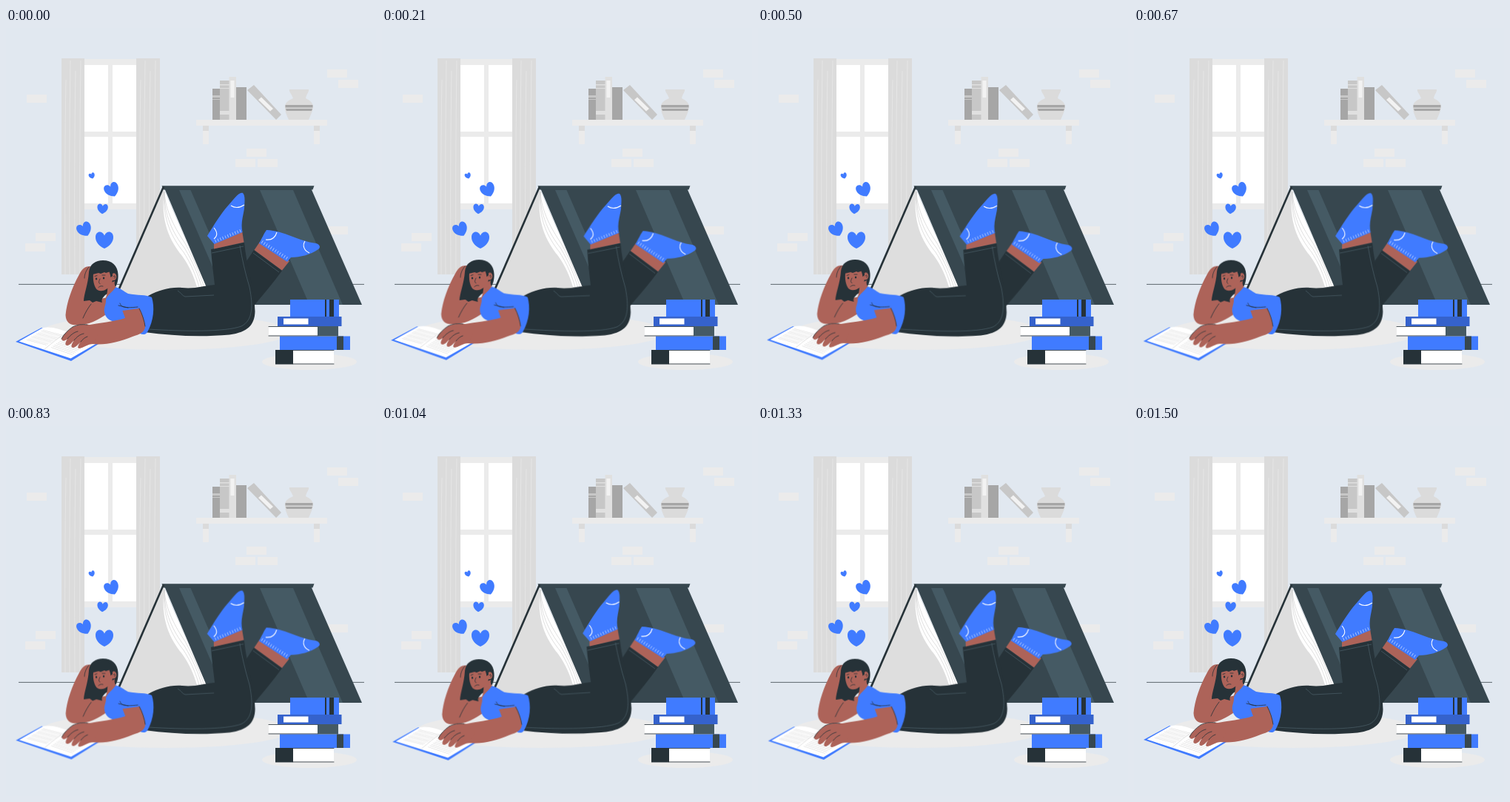
Animation, 500 px wide and 500 px high, one loop 1.54 s. Source, as an HTML page:

```html
<!DOCTYPE html>
<html lang="en">
<head>
<meta charset="utf-8">
<title>Reading by the tent</title>
<style>
  html, body { margin: 0; width: 100%; height: 100%; overflow: hidden; background: #e1e8f0; }
  svg { display: block; width: 100vw; height: 100vh; }
  #reader { transform-origin: 218.5px 336px; }
  .blue { fill: #407bff; }
  .dark { fill: #263238; }
  .slate { fill: #37474f; }
  .steel { fill: #455a64; }
  .skin { fill: #ad6359; }
  .pale { fill: #ebebeb; }
  .white { fill: #fff; }
  .line { fill: none; stroke: #263238; stroke-width: .8; stroke-linecap: round; stroke-linejoin: round; }
  .seam { fill: none; stroke: #536873; stroke-width: .6; }
  .knit { fill: none; stroke: #fff; stroke-width: 1.1; }
  .rib { fill: none; stroke: #dbe6ff; stroke-width: 4; stroke-dasharray: .6 3; }
  .page { fill: none; stroke: #c9c9c9; stroke-width: .6; }
  .text { stroke: #dedede; stroke-width: 1; stroke-dasharray: .03 .065; }
</style>
</head>
<body>
<svg viewBox="0 0 500 500">
  <defs>
    <path id="heart" class="blue" d="M0 12C-7 9-12.500 3-12-4C-11.500-12-3-13 0-5.500C3-13 11.500-12 12-4C12.500 3 7 9 0 12Z"/>
  </defs>

  <g id="bricks" class="pale"></g>

  <!-- window -->
  <path class="pale" d="M104 42H178V245H104Z"/>
  <path class="white" d="M106 50H138V140H106ZM144 50H177V140H144ZM106 147H138V237H106ZM144 147H177V237H144Z"/>
  <path fill="#dbdbdb" d="M75 41H106V333H75ZM176 41H208V333H176Z"/>
  <g id="folds" fill="none" stroke="#e6e6e6" stroke-width="1"></g>

  <!-- shelf -->
  <path class="pale" d="M257 124H434V132H257ZM266 132H274V157H266ZM416 132H424V157H416Z"/>
  <path fill="#dbdbdb" d="M266 132H274V139H266ZM416 132H424V139H416Z"/>
  <path fill="#a6a6a6" d="M279 82H290V124H279ZM310 80H325V124H310Z"/>
  <path fill="#c7c7c7" d="M279 91H290V94H279ZM279 96H290V97H279ZM289 71H302V124H289ZM326 84L335 77L372 117L365 124Z"/>
  <path fill="#e0e0e0" d="M289 76H302V77.500H289ZM289 81H302V82H289ZM289 112H302V117H289ZM301.500 66H311V124H301.500Z"/>
  <path fill="#f2f2f2" d="M303.500 71H308.500V94H303.500ZM341 97L345 93.500L361 109L357 112.500Z"/>
  <path fill="#dbdbdb" d="M383 83H409C410 86 406 89 405 95C411 98 415 101 415 107C414 114 411 119 409 124H382C380 119 377 114 377 107C377 101 381 98 388 95C386 89 382 86 383 83Z"/>
  <path fill="#a6a6a6" d="M377.500 104H414.500V107.500H377.500ZM378 109H414L413 112H379Z"/>

  <path d="M17 346.400H484" stroke="#263238" stroke-width=".7"/>

  <!-- tent -->
  <path fill="#dedede" d="M213 218L144 374H282Z"/>
  <path class="slate" d="M213 214H411L481 374H281Z"/>
  <path class="steel" d="M234 219H249.500L317 374H301.500ZM343 219H388L455 374H410Z"/>
  <path class="slate" d="M210.500 213.300H416.500L414.500 218.500H213Z"/>
  <path class="white" d="M214 219C222 240 232 262 241 282C252 307 262 330 270.500 350H258C254 336 248 322 238 308C222 288 208 262 214 219Z"/>
  <path class="page" d="M214 221C211 258 224 283 240 303C251 320 257 336 261 350M214 221C213 252 226 278 241 297C253 317 260 334 264.500 350M214 221C215 247 229 272 242 291C254 313 262 332 267.500 350"/>
  <path class="dark" d="M211.500 214.500H214.300L145 374H142Z"/>

  <!-- floor -->
  <ellipse class="pale" cx="216" cy="411" rx="168" ry="24"/>
  <ellipse class="pale" cx="410" cy="451" rx="64" ry="11"/>

  <!-- stack -->
  <path class="blue" d="M384 367H450V390H384ZM370 416.500H465V435H370Z"/>
  <path class="dark" d="M431 367H433V390H431ZM437 367H443V390H437ZM364 435H388V454.500H364Z"/>
  <path fill="#3562cc" d="M367 390H453.500V403H367Z"/>
  <path class="white" d="M375 392.500H408.500V400.500H375ZM355 404H421V415H355ZM388 436.500H443V453H388Z"/>
  <path class="steel" d="M421 403H449V416.500H421Z"/>
  <path class="slate" d="M447 416.500H456V435H447Z"/>
  <path class="line" d="M355 403.500H421M355 416H421M388 435.500H443M388 454H443"/>

  <g id="hearts"></g>

  <g id="reader">
    <!-- open book -->
    <path class="blue" d="M13 424L48 405L52 406L125 427L88 450Z"/>
    <path class="white" d="M17.500 423.500L50 405C62 403 72 407 84 411C96 411 112 419 122 426.500L87.500 446.500Z"/>
    <path class="page" d="M84 411C72 417 62 426 52 434"/>
    <path class="text" d="M.5 0V1" transform="matrix(27 7 -23 14 50 408)"/>
    <path class="text" d="M.5 0V1" transform="matrix(29 10 -24 17 84 415)"/>

    <!-- far leg -->
    <path class="dark" d="M335 300L373 328C362 343 349 359 336 374L318 390L315 330Z"/>
    <path class="seam" d="M334 304L369 330"/>
    <path class="skin" d="M343 289L383 315L373 327.500L335.500 300Z"/>
    <path class="blue" d="M342 291C346 284 349 277 352 273C376 274 395 288 419 291C425 293 425 297 422 299C412 306 398 310 385 310L380 316Z"/>
    <path class="knit" d="M366 276C364 283 359 287 351 286M404 288C400 294 403 301 410 304"/>
    <path class="rib" d="M346 289L381 312"/>

    <!-- near leg and hips -->
    <path class="dark" d="M192 362C208 354 220 350 238 351C255 353 268 348 282 347C280 330 278 315 277 299L322 290C325 322 336 352 336.500 383C336 401 327 411 302 414.500C262 418 225 416 187 411Z"/>
    <path class="seam" d="M232 355C236 357 238 362 242 363L281 361M192 407C240 410 296 411 318 403C334 395 334 375 329 350C323 330 319 312 316 294M278 304L321 295"/>
    <path class="skin" d="M281 291L319 274L321.500 289.500L281 298.500Z"/>
    <path class="blue" d="M281.500 292L272 281C281 266 291 250 301 239C308 231 315 221 320 223C324 227 322 237 322 244C320 256 317 264 319.500 276Z"/>
    <path class="knit" d="M281 270C286 276 286 281 281 285M304 240C310 244 316 243 322 239"/>
    <path class="rib" d="M283 288L319 273"/>

    <!-- propping arm -->
    <path class="skin" d="M114 322C107 322 103 325 99 333C89 351 82 371 80.500 388C81 399 88 403 101 401C117 400 130 391 142 382L137 364L114 369Z"/>
    <path class="line" d="M104 392C107 385 111 378 115 373M112 323C108 328 106 333 106 338"/>

    <!-- head -->
    <path class="dark" d="M112 330C113 319 121 314 131 314C143 314 151 321 151.500 333C152 341 150 348 146 353L134 361C129 366 129 368 130 371L122 369L117 371L113 368L105 369C105 361 111 346 112 330Z"/>
    <path class="skin" d="M137 346L147 342C146 346 147 349 150 352L143 363L133 370C136 362 138 355 137 346Z"/>
    <path class="skin" d="M118.500 328C117 338 118 345 121 351C124 357 132 356 137 352C141 349 143 345 144 341C148 342 150 338 149 334C147 330 144 331 142.500 334L141 326Z"/>
    <path class="dark" d="M112 332C114 322 121 316 131 316C139 317 144 324 144 335L141.500 337C141 334 140.500 332 139.500 329.500L135 331L133 330L128 332L125 331L117 333Z"/>
    <path class="line" d="M120 335.500L123 334.500M130 334L134 334M127 339C125 343 125 345 127 345.500M125 350.500C127 348.500 129 348.500 131 349M145 336C147 334 148 335 147 338"/>
    <path class="dark" d="M122 337.500a1.200 1.500 0 1 0 .1 0ZM132 336.500a1.200 1.500 0 1 0 .1 0Z"/>

    <!-- shirt -->
    <path class="blue" d="M148 350.500C153 350 159 356 165 359C177 361.500 190 360 197 364C201 377 200 395 191 411C188 415 185 414.500 181 413L150 397C140 397 134 391 133 384C132 378 135 374 135 369C134 363 143 358 148 350.500Z"/>
    <path class="skin" d="M157 381L180 378C184 386 188 396 188 404C187 411 181 414 171 417C153 424 135 429 116 427L108 402C127 398 146 397 161 392Z"/>
    <path class="blue" d="M153 378C152 371 155 365 164 364C174 364 178 371 180 379L157 382Z"/>
    <path class="line" d="M154 372C156 377 158 379 178 377M152 375L165 378M180 379C184 386 187 396 188 403"/>

    <!-- hand -->
    <path class="skin" d="M113 401C104 400 96 401 90 404C83 409 77 415 75 420C76 424 80 423 83 420C80 425 79 429 83 429C86 429 89 425 92 422C88 428 87 432 91 432C95 431 98 427 101 424C97 429 96 433 99 433C105 432 110 427 118 427L124 414Z"/>
    <path class="line" d="M75 420C78 414 84 408 90 404C96 401 103 400 110 401M83 420C87 415 92 411 97 410M92 422C96 417 100 414 105 413M101 424C104 420 107 418 110 417"/>
  </g>
</svg>
<script>
  const add = (id, tag, attrs) => {
    const el = document.createElementNS("http://www.w3.org/2000/svg", tag);
    for (const key in attrs) el.setAttribute(key, attrs[key]);
    document.getElementById(id).append(el);
  };

  const bricks = [[28, 90], [434, 56], [449, 70], [325, 163], [310, 177], [340, 177], [40, 277], [26, 291], [435, 268]];
  for (const [x, y] of bricks) add("bricks", "rect", { x, y, width: 27, height: 11 });

  for (const left of [75, 176])
    for (const [dx, top] of [[5, 70], [11, 44], [18, 58], [25, 44]])
      add("folds", "path", { d: `M${left + dx + 1} ${top}Q${left + dx - 1} 180 ${left + dx} 333` });

  // x, y, scale, tilt
  const hearts = [[116, 199.5, .34, -18], [143, 218.5, .82, -24], [130.5, 244, .6, 4], [106, 272, .82, -27], [133, 286, 1, 0]];
  for (const [x, y, size, tilt] of hearts)
    add("hearts", "use", { href: "#heart", transform: `translate(${x} ${y}) rotate(${tilt}) scale(${size})` });

  // A linear sway with a short rest at the end of each loop.
  const loop = 1540;
  const sway = [[0, 0], [375, 1], [1125, -1], [1500, 0], [loop, 0]];
  document.getElementById("reader").animate(
    sway.map(([time, angle]) => ({ offset: time / loop, transform: `rotate(${angle}deg)` })),
    { duration: loop, iterations: Infinity }
  );
</script>
</body>
</html>
```
